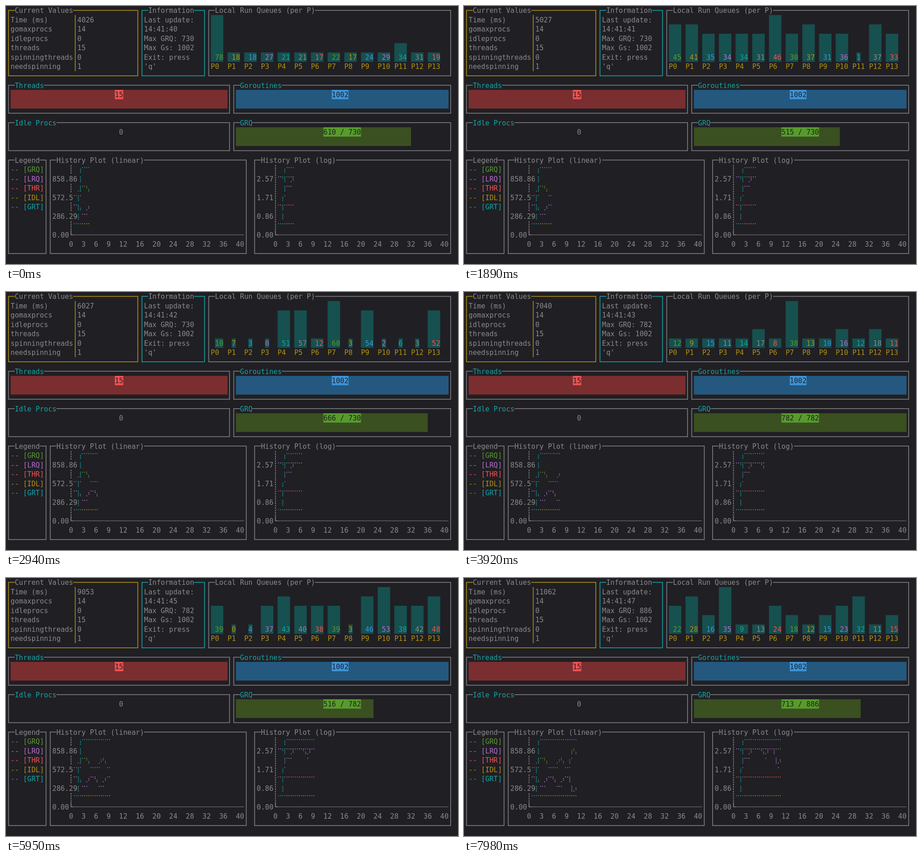
Write an HTML page with a canvas that moves like this. It is 989 px wide and 566 px high and loops after 8 s.

```html
<!DOCTYPE html>
<html lang="en">
<head>
<meta charset="utf-8">
<title>Scheduler monitor</title>
<style>
html, body { margin: 0; width: 100%; height: 100%; overflow: hidden; background: #201f24; }
canvas { display: block; }
</style>
</head>
<body>
<canvas id="screen" width="989" height="566"></canvas>
<script>
const ctx = document.getElementById('screen').getContext('2d');
const CW = 9.127, CH = 20.52, X0 = 0.9, Y0 = -0.7;
const LOOP = 8000;
const C = {
  bg: '#201f24', grey: '#8a8a8b', line: '#808081', yellow: '#b29210', cyan: '#12a6a6',
  green: '#579b2c', blue: '#3b95db', magenta: '#b070c9', red: '#f15252',
  bar: '#16504f', redDim: '#7a2e2f', blueDim: '#24587f', greenDim: '#3a5020'
};
const numColors = [C.green, C.yellow, C.blue, C.magenta, C.cyan, C.grey, C.red];

// One state per update: start in the loop, elapsed ms, run queue length of each P
const states = [
  [0, 4026, '78 18 18 27 21 21 17 22 17 24 29 34 31 19'],
  [980, 5027, '45 41 35 34 34 31 46 30 37 31 36 1 37 33'],
  [2030, 6027, '10 7 3 0 51 57 12 60 3 54 2 6 3 52'],
  [3080, 7040, '12 9 15 11 14 17 8 38 13 10 16 12 18 11'],
  [4060, 8051, '22 33 36 31 22 26 27 29 35 21 20 29 25 21'],
  [5110, 9053, '39 0 4 37 43 40 38 39 3 46 53 38 42 48'],
  [6160, 10059, '5 4 5 3 8 6 4 5 6 11 18 4 7 14'],
  [7210, 11062, '22 28 16 35 9 13 24 18 12 15 23 32 11 15']
].map(([start, ms, q]) => ({ start, ms, queues: q.split(' ').map(Number) }));

// History, one value per second
const grq = [560, 700, 730, 610, 515, 666, 782, 609, 516, 886, 713];
const series = [
  [grq, C.green],
  [grq.map(v => 986 - v), C.magenta],
  [grq.map(() => 15), C.red],
  [grq.map(() => 0), C.yellow],
  [grq.map((v, i) => i ? 1002 : 1), C.cyan]
];

const px = c => X0 + c * CW;
const py = r => Y0 + r * CH;

function fill(c, r, w, h, color) {
  ctx.fillStyle = color;
  ctx.fillRect(px(c), py(r), w * CW, h * CH);
}

function text(c, r, str, color, back) {
  str = String(str);
  if (back) fill(c, r, str.length, 1, back);
  ctx.fillStyle = color;
  [...str].forEach((ch, i) => ctx.fillText(ch, px(c + i + 0.5), py(r + 0.5) + 5.8));
}

function stroke(points, color, dash = []) {
  ctx.strokeStyle = color;
  ctx.lineWidth = 1.6;
  ctx.setLineDash(dash);
  ctx.beginPath();
  points.forEach(([c, r]) => ctx.lineTo(px(c), py(r)));
  ctx.stroke();
}

function box(c0, r0, c1, r1, title, titleColor = C.grey, color = C.line) {
  ctx.strokeStyle = color;
  ctx.lineWidth = 1.6;
  ctx.setLineDash([]);
  ctx.strokeRect(px(c0 + 0.5), py(r0 + 0.5), (c1 - c0) * CW, (r1 - r0) * CH);
  text(c0 + 2, r0, title, titleColor, C.bg);
}

function gauge(c0, r0, c1, title, percent, label, dim, bright) {
  box(c0, r0, c1, r0 + 3, title, C.cyan);
  const inner = c1 - c0 - 1;
  const mid = c0 + 1 + Math.floor(inner / 2) - Math.floor(label.length / 2);
  const width = Math.floor(percent * inner / 100);
  fill(c0 + 1, r0 + 1, width, 2, dim);
  text(mid, r0 + 1, label, width ? C.bg : C.grey, width ? bright : null);
}

function queueChart(queues) {
  box(48, 0, 106, 7, 'Local Run Queues (per P)');
  const max = Math.max(...queues);
  queues.forEach((v, i) => {
    const c = 49 + i * 4, h = Math.floor(v / max * 5);
    fill(c, 6 - h, 3, h, C.bar);
    text(c + 1, 5, v, numColors[i % 7], h ? null : C.bar);
    text(c, 6, 'P' + i, C.yellow);
  });
}

// Dots of a line on the 2 x 4 grid of each cell, right end excluded
function linePoints(x0, y0, x1, y1, plot) {
  const step = (y1 - y0) / (x1 - x0), sign = Math.sign(step);
  let y = y0, goal = y0;
  for (let x = x0; x < x1; x++) {
    plot(x, y);
    goal += step;
    while (y !== Math.trunc(goal)) {
      plot(x, y);
      y += sign;
    }
  }
}

function historyPlot(c0, c1, title, scale, count) {
  box(c0, 16, c1, 26, title);
  const axis = c0 + 5, max = scale(1002);
  stroke([[axis + 0.5, 17.04], [axis + 0.5, 24]], C.grey, [3.3, CH / 4 - 3.3]);
  stroke([[axis + 0.5, 24], [axis + 0.5, 24.5], [axis + 1, 24.5]], C.grey);
  stroke([[axis + 1, 24.5], [c1, 24.5]], C.grey, [1.45, CW / 4 - 1.45]);
  for (let i = 0; i < 4; i++)
    text(c0 + 1, 24 - 2 * i, (i * 2 * max / 7).toFixed(2), C.grey, C.bg);
  for (let x = 0; x <= 40; x += x < 12 ? 3 : 4) text(axis + x, 25, x, C.grey);

  const cells = new Map();
  for (const [data, color] of series) {
    const rowY = i => (23 - Math.floor(Math.max(0, scale(data[i])) / max * 6)) * 4;
    for (let j = 0; j < count; j++) {
      const x = (axis + 1 + j) * 2;
      linePoints(x, rowY(Math.max(0, j - 1)), x + 2, rowY(j), (dx, dy) => {
        const c = dx >> 1, r = dy >> 2, key = c + ',' + r;
        const cell = cells.get(key) || { c, r, dots: new Set() };
        cell.color = color;
        cell.dots.add((dy & 3) * 2 + (dx & 1));
        cells.set(key, cell);
      });
    }
  }
  for (const { c, r, dots, color } of cells.values()) {
    fill(c, r, 1, 1, C.bg);
    ctx.fillStyle = color;
    for (const d of dots) {
      const x = px(c + 0.5) + ((d & 1) - 0.5) * 4.5;
      const y = py(r + 0.5) + ((d >> 1) - 1.5) * 3.5 + 1.3;
      ctx.fillRect(x - 0.9, y - 0.9, 1.8, 1.8);
    }
  }
}

function draw(index) {
  const { ms, queues } = states[index];
  const count = index + 4;
  const now = grq[count - 1];
  const peak = Math.max(...grq.slice(0, count));
  ctx.fillStyle = C.bg;
  ctx.fillRect(0, 0, 989, 566);
  ctx.font = '15.16px "DejaVu Sans Mono", monospace';
  ctx.textAlign = 'center';

  box(0, 0, 31, 7, 'Current Values', C.grey, C.yellow);
  stroke([[16.5, 1], [16.5, 7]], C.yellow);
  const values = [['Time (ms)', ms], ['gomaxprocs', 14], ['idleprocs', 0],
    ['threads', 15], ['spinningthreads', 0], ['needspinning', 1]];
  values.forEach(([name, v], i) => {
    text(1, i + 1, name, C.grey);
    text(17, i + 1, v, C.grey);
  });

  box(32, 0, 47, 7, 'Information', C.grey, C.cyan);
  ['Last update:', '14:41:' + (40 + index), 'Max GRQ: ' + peak, 'Max Gs: 1002', 'Exit: press', "'q'"]
    .forEach((s, i) => text(33, i + 1, s, C.grey));

  queueChart(queues);
  gauge(0, 8, 53, 'Threads', 100, '15', C.redDim, C.red);
  gauge(54, 8, 106, 'Goroutines', 100, '1002', C.blueDim, C.blue);
  gauge(0, 12, 53, 'Idle Procs', 0, '0');
  gauge(54, 12, 106, 'GRQ', Math.floor(now * 100 / peak), now + ' / ' + peak, C.greenDim, C.green);

  box(0, 16, 9, 26, 'Legend');
  ['GRQ', 'LRQ', 'THR', 'IDL', 'GRT'].forEach((s, i) =>
    text(1, 17 + i, '-- [' + s + ']', series[i][1]));
  historyPlot(10, 57, 'History Plot (linear)', v => v, count);
  historyPlot(59, 106, 'History Plot (log)', v => v > 0 ? Math.log10(v) : 0, count);
}

let shown = -1;
function tick() {
  const t = performance.now() % LOOP;
  const index = states.filter(s => s.start <= t).length - 1;
  if (index !== shown) draw(shown = index);
  requestAnimationFrame(tick);
}
tick();
</script>
</body>
</html>
```
